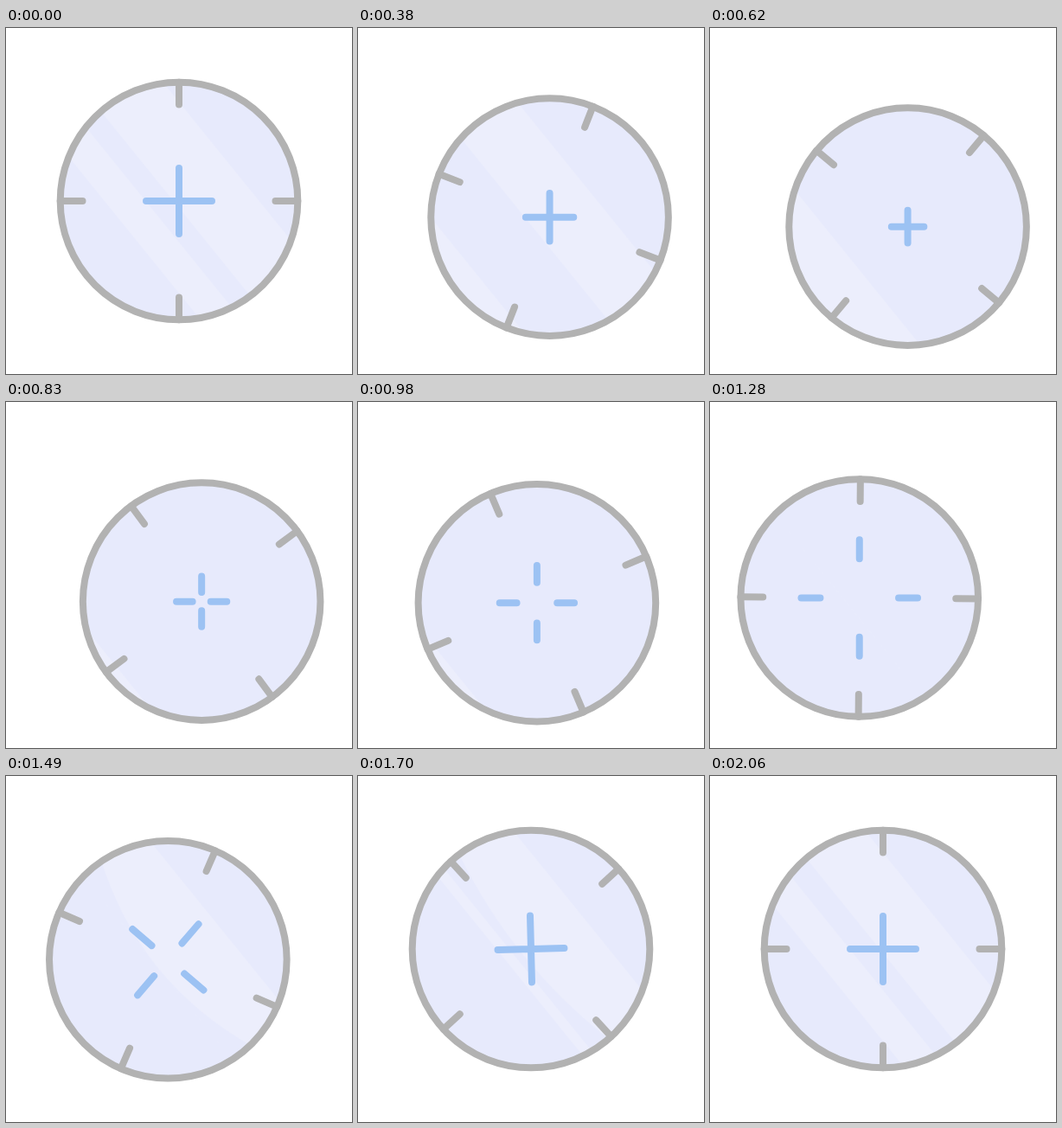
Animation, 400 px wide and 400 px high, one loop 2.15 s. Source, as an HTML page with a canvas:

```html
<!DOCTYPE html>
<html>
<head>
<meta charset="utf-8">
<style>
html, body { margin: 0; width: 100%; height: 100%; overflow: hidden; background: #fff; }
canvas { display: block; }
</style>
</head>
<body>
<canvas id="stage" width="400" height="400"></canvas>
<script>
const ctx = document.getElementById('stage').getContext('2d');
const LOOP = 2150, START = 200, END = 2060, STEP = 30;
// The lens moves out, swings left, then comes home
const TURN = 710, LEFT = 1270;
const GREY = '#b2b2b2', BLUE = '#9cc2f3', GLASS = '#e7eafc', SHINE = '#eceefc';

const rad = deg => deg * Math.PI / 180;
const span = (t, from, to) => Math.max(0, Math.min(1, (t - from) / (to - from)));
const easeOut = (u, power) => 1 - (1 - u) ** power;
const smooth = (t, from, to) => {
  const u = span(t, from, to);
  return u * u * (3 - 2 * u);
};

function lensCentre(t) {
  const out = span(t, START, TURN);
  const swing = smooth(t, 765, LEFT);
  const home = smooth(t, LEFT, 1690);
  return [
    200 + 28.7 * easeOut(out, 3.2) - 56 * swing + 27.3 * home,
    200 + 30.3 * easeOut(out, 2.2) - 3.8 * swing + 3.6 * Math.sin(Math.PI * swing) - 26.5 * home
  ];
}

// Parallel reflections, given by near edge, far edge and bend of the far edge
function reflections(t) {
  if (t < LEFT) {
    const wide = -72 + 196 * smooth(t, 290, 780) + 26 * span(t, 980, LEFT);
    const narrow = 30 + 120 * span(t, START, 480);
    return [[wide, wide + 77, 0], [narrow, narrow + 37, 0]];
  }
  const enter = smooth(t, LEFT, 1490);
  const part = smooth(t, 1490, END);
  const bend = 29 * Math.sin(Math.PI * span(t, LEFT, 1800));
  return [
    [-150 + 80 * enter, -150 + 165 * enter - 12 * part, bend],
    [15 + 15 * part, 15 + 52 * part, 0]
  ];
}

function drawBand([near, far, bend]) {
  ctx.beginPath();
  ctx.moveTo(-140, near);
  ctx.lineTo(140, near);
  ctx.lineTo(140, far - bend);
  ctx.quadraticCurveTo(0, far + bend, -140, far - bend);
  ctx.fill();
}

function spokes(inner, outer, turn, color) {
  ctx.strokeStyle = color;
  ctx.beginPath();
  for (let i = 0; i < 4; i++) {
    const a = rad(turn + 90 * i), c = Math.cos(a), s = Math.sin(a);
    ctx.moveTo(inner * c, inner * s);
    ctx.lineTo(outer * c, outer * s);
  }
  ctx.stroke();
}

function draw(t) {
  const shrink = easeOut(span(t, START, TURN), 1.6);
  const split = easeOut(span(t, TURN, LEFT), 1.1);
  const join = smooth(t, LEFT + 5, 1735);
  const spin = span(t, LEFT + 5, END) ** 1.04;

  ctx.clearRect(0, 0, 400, 400);
  ctx.save();
  ctx.translate(...lensCentre(t));
  ctx.lineWidth = 8;
  ctx.lineCap = 'round';

  const disc = new Path2D();
  disc.arc(0, 0, 137.3, 0, 2 * Math.PI);
  ctx.fillStyle = GLASS;
  ctx.fill(disc);

  ctx.save();
  ctx.clip(disc);
  ctx.rotate(rad(51));
  ctx.fillStyle = SHINE;
  reflections(t).forEach(drawBand);
  ctx.restore();

  spokes(45.3 * (split - join), 38 - 20.5 * shrink + 49.8 * split - 29.3 * join, 90 * join, BLUE);
  ctx.strokeStyle = GREY;
  ctx.stroke(disc);
  spokes(111.5, 137.3, 42.5 * shrink + 47.5 * split + 90 * spin, GREY);
  ctx.restore();
}

function frame() {
  const t = performance.now() % LOOP;
  const stepped = START + Math.floor((t - START) / STEP) * STEP;
  draw(Math.max(START, Math.min(END, stepped)));
  requestAnimationFrame(frame);
}
frame();
</script>
</body>
</html>
```
